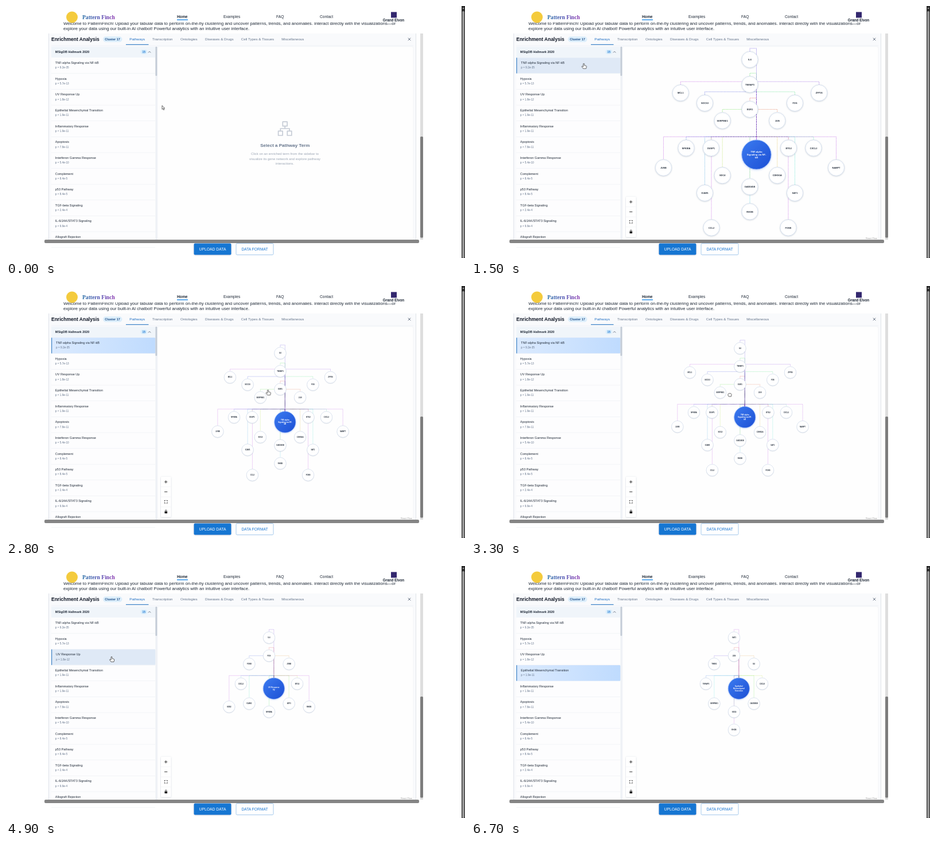
An HTML page for the animation above (6.8 s loop, 800 by 440 pixels).

```html
<!DOCTYPE html>
<html lang="en">
<head>
<meta charset="utf-8">
<title>Enrichment analysis</title>
<style>
  html, body { margin: 0; width: 100%; height: 100%; overflow: hidden; background: #fff; }
  svg { display: block; width: 800px; height: 440px; }
  text { font-family: "Liberation Sans", Arial, sans-serif; dominant-baseline: central; fill: #1f2937; white-space: pre; }
  .b { font-weight: 700; }
  .mid { text-anchor: middle; }
  .nav text { font-size: 6.7px; }
  .intro text { font-size: 7.65px; }
  .tabs text { font-size: 6.2px; fill: #64748b; }
  .hint text { font-size: 5.93px; fill: #9ca6b5; }
  .term { font-size: 5.5px; }
  .pval { font-size: 4.7px; fill: #64748b; }
  .gene { font-size: 3.9px; font-weight: 700; }
  .hub { font-size: 4.15px; font-weight: 700; fill: #fff; }
  .edges path { fill: none; stroke-width: .95; stroke-dasharray: 1.3 1.3; opacity: .58; }
  .line { fill: none; stroke-linecap: round; stroke-linejoin: round; }
  .cursor path { stroke: #222; stroke-width: .7; stroke-linejoin: round; fill: #fff; }
</style>
</head>
<body>
<svg viewBox="0 0 800 440">
  <defs>
    <linearGradient id="brand"><stop stop-color="#2a6fa8"/><stop offset=".5" stop-color="#4a4fb0"/><stop offset="1" stop-color="#8a36b0"/></linearGradient>
    <linearGradient id="picked"><stop stop-color="#dbeafe"/><stop offset="1" stop-color="#bfdbfe"/></linearGradient>
    <linearGradient id="hubFill" x2="1" y2="1"><stop stop-color="#3b7bf0"/><stop offset="1" stop-color="#1d4fd4"/></linearGradient>
    <filter id="soft" x="-30%" y="-30%" width="160%" height="160%"><feDropShadow dx="0" dy=".6" stdDeviation=".9" flood-color="#64748b" flood-opacity=".35"/></filter>
    <filter id="glow" x="-30%" y="-30%" width="160%" height="160%"><feDropShadow dx="0" dy="1" stdDeviation="1.8" flood-color="#2563eb" flood-opacity=".3"/></filter>
    <clipPath id="pane"><rect x="264" y="71" width="446" height="337"/></clipPath>
    <clipPath id="under"><rect y="28.5" width="790" height="20"/></clipPath>
  </defs>

  <rect width="800" height="440" fill="#fff"/>
  <g class="intro" clip-path="url(#under)">
    <text x="100" y="30">Welcome to PatternFinch! Upload your tabular data to perform on-the-fly clustering and uncover patterns, trends, and anomalies. Interact directly with the visualizations—or</text>
    <text x="100" y="39">explore your data using our built-in AI chatbot! Powerful analytics with an intuitive user interface.</text>
  </g>
  <g class="nav">
    <circle cx="115" cy="19.5" r="10" fill="#f4cb3d"/>
    <text x="133" y="19" class="b" style="font-family:'Liberation Serif',serif;font-size:9.6px;fill:url(#brand)">Pattern Finch</text>
    <text x="298" y="18.5" class="b">Home</text>
    <rect x="298" y="23.4" width="19" height="1.4" fill="#1e88e5"/>
    <text x="379" y="18.5">Examples</text>
    <text x="471" y="18.5">FAQ</text>
    <text x="547" y="18.5">Contact</text>
    <rect x="671" y="10.5" width="10" height="10" fill="#33276e"/>
    <text x="675.5" y="24.7" class="b mid" style="font-size:6.3px">Grand Elvon</text>
  </g>

  <!-- panel -->
  <rect x="74.5" y="48" width="640" height="366" fill="#f9fafc"/>
  <path d="M74.5 48V408M714.5 48V408" stroke="#dfe3e9"/>
  <rect x="79" y="71" width="183" height="340" fill="#fdfdfe"/>
  <rect x="264" y="71" width="446" height="340" rx="3" fill="#fefefe" stroke="#eef1f5" stroke-width=".6"/>
  <text x="79" y="58.3" class="b" style="font-size:8.5px;fill:#111827">Enrichment Analysis</text>
  <rect x="169" y="53.3" width="33.5" height="9.6" rx="4.8" fill="#dceefb"/>
  <text x="172.2" y="58.1" class="b" style="font-size:5.5px;fill:#1d4e89">Cluster 17</text>
  <g class="tabs">
    <text x="215.3" y="57.5" style="fill:#1f6fc4">Pathways</text>
    <text x="255" y="57.5">Transcription</text>
    <text x="304" y="57.5">Ontologies</text>
    <text x="347" y="57.5">Diseases &amp; Drugs</text>
    <text x="409.8" y="57.5">Cell Types &amp; Tissues</text>
    <text x="480.2" y="57.5">Miscellaneous</text>
  </g>
  <path d="M79 69.2H710" stroke="#e8ecf1" stroke-width=".6"/>
  <rect x="209" y="66.8" width="39.5" height="1.2" fill="#3b82c8"/>
  <path class="line" d="M701 56l4 4M705 56l-4 4" stroke="#475569" stroke-width=".8"/>

  <!-- sidebar -->
  <rect x="79" y="71" width="181" height="19" fill="#f0f5fa"/>
  <text x="85.8" y="80" class="b term">MSigDB Hallmark 2020</text>
  <rect x="234.7" y="76" width="11.3" height="8" rx="4" fill="#d9edfb"/>
  <text x="240.3" y="80.1" class="b mid" style="font-size:5px;fill:#1976d2">15</text>
  <path class="line" d="M248.2 81.2l1.9-1.9 1.9 1.9" stroke="#475569" stroke-width=".8"/>
  <g id="rows"></g>
  <rect x="260.5" y="71" width="3" height="337" fill="#eef1f5"/>
  <rect x="260.5" y="71" width="2.8" height="51" rx="1" fill="#c3cbd6"/>

  <!-- empty state -->
  <g id="empty">
    <path class="line" d="M482.3 202.2h7.8v7.5h-7.8zM474.6 218.4h7.5v7.6h-7.5zM490.3 218.4h7.5v7.6h-7.5zM486.2 210v4M478.3 218v-4h15.8v4" stroke="#c6ccd6" stroke-width="1.7"/>
    <text x="486.3" y="243.5" class="b mid" style="font-size:8px;fill:#64748b">Select a Pathway Term</text>
    <g class="hint mid">
      <text x="486" y="257.6">Click on an enriched term from the sidebar to</text>
      <text x="486" y="266.5">visualize its gene network and explore pathway</text>
      <text x="486" y="275.4">interactions.</text>
    </g>
  </g>

  <!-- network -->
  <g clip-path="url(#pane)">
    <g id="view"></g>
    <g id="tools">
      <rect x="270" y="333" width="17.5" height="70.5" rx="1.5" fill="#fff" filter="url(#soft)"/>
      <path d="M270 350.6h17.5M270 368.2h17.5M270 385.8h17.5" stroke="#eef0f3" stroke-width=".6"/>
      <path class="line" d="M276.5 342h4.4M278.7 339.8v4.4M276.5 359.4h4.4" stroke="#222" stroke-width=".9"/>
      <path d="M276.4 376v-1.6h1.6M279.6 374.4h1.6v1.6M281.2 377.6v1.6h-1.6M278 379.2h-1.6v-1.6" fill="none" stroke="#222" stroke-width=".8"/>
      <rect x="276.5" y="393.4" width="4.6" height="3.6" rx=".6" fill="#111"/>
      <path class="line" d="M277.5 393.4v-1a1.3 1.3 0 0 1 2.6 0v1" stroke="#111" stroke-width=".8"/>
      <text x="688" y="405.8" style="font-size:4px;fill:#999">React Flow</text>
    </g>
    <rect id="veil" x="264.5" y="71.5" width="445" height="337" fill="#fefefe" fill-opacity=".85"/>
    <g id="loader" transform="translate(486 240)">
      <circle r="9.8" fill="none" stroke="#dadee5" stroke-width="1.7"/>
      <circle id="arc" r="9.8" fill="none" stroke="#2f6bea" stroke-width="1.7" stroke-dasharray="14 100"/>
    </g>
  </g>

  <!-- scrollbars and buttons -->
  <rect x="722" y="48" width="5" height="360" fill="#dedede"/>
  <rect x="722" y="228" width="5" height="176.5" rx="1.5" fill="#7d7d7d"/>
  <rect x="67" y="408" width="653" height="6" rx="2" fill="#858585"/>
  <rect x="327.5" y="414.5" width="65" height="20" rx="2" fill="#1976d2" filter="url(#soft)"/>
  <text x="360" y="424" class="mid" style="font-size:6.8px;fill:#fff">UPLOAD DATA</text>
  <rect x="401" y="414.5" width="65" height="20" rx="2" fill="#fff" stroke="#8fbce8" stroke-width=".8"/>
  <text x="433.5" y="424" class="mid" style="font-size:6.7px;fill:#1976d2">DATA FORMAT</text>
  <rect x="794" width="6" height="440" fill="#2d2d2d"/>
  <rect x="795.2" y="9" width="3.7" height="431" rx="1.5" fill="#9b9b9b"/>
  <path d="M795.5 5l1.6-2.5 1.6 2.5z" fill="#aaa"/>

  <g id="cursor" class="cursor">
    <path id="arrow" d="M0 0V6.6L1.6 5.2 2.7 7.7 3.8 7.2 2.7 4.8H4.7Z"/>
    <path id="hand" d="M-.9 .8Q0-.7 .9 .8V3.6L4 4.4Q5 4.8 4.8 6L4 9.3H-1L-3.4 5.8Q-3.3 4.6-2.2 5L-.9 6Z"/>
    <path id="fist" d="M-2.6-1.6Q-1.8-3-.8-2.2Q.2-3 1-2.2Q2.2-2.6 2.6-1.4Q3.4-1 3 .8L2.3 3H-1.7L-3.2 .6Z"/>
  </g>
</svg>

<script>
const LOOP = 6800;
const $ = id => document.getElementById(id);

function add(parent, tag, attrs = {}, text = "") {
  const el = document.createElementNS("http://www.w3.org/2000/svg", tag);
  for (const k in attrs) el.setAttribute(k, attrs[k]);
  el.textContent = text;
  return parent.appendChild(el);
}

// keys: [ms, value, easing]; holds the first and last value at the ends
function animate(el, prop, keys, easing = "linear") {
  const all = [...keys];
  if (all[0][0] > 0) all.unshift([0, all[0][1]]);
  if (all.at(-1)[0] < LOOP) all.push([LOOP, all.at(-1)[1]]);
  el.animate(all.map(([t, v, e]) => ({ offset: t / LOOP, [prop]: v, easing: e || easing })),
    { duration: LOOP, iterations: Infinity });
}

// on: value inside the [from, to] spans, off: elsewhere, with hard changes
function toggle(el, prop, on, off, spans) {
  const keys = [];
  if (spans[0][0] > 0) keys.push([0, off]);
  for (const [from, to] of spans) {
    keys.push([from, on]);
    if (to < LOOP) keys.push([to, off]);
  }
  animate(el, prop, keys, "step-end");
}
const show = (el, ...spans) => toggle(el, "opacity", 1, 0, spans);

// sidebar terms
const terms = [
  ["TNF-alpha Signaling via NF-kB", "9.2e-35"], ["Hypoxia", "5.7e-13"],
  ["UV Response Up", "1.8e-12"], ["Epithelial Mesenchymal Transition", "1.9e-11"],
  ["Inflammatory Response", "1.9e-11"], ["Apoptosis", "7.8e-11"],
  ["Interferon Gamma Response", "5.4e-10"], ["Complement", "8.4e-5"],
  ["p53 Pathway", "8.4e-5"], ["TGF-beta Signaling", "2.4e-4"],
  ["IL-6/JAK/STAT3 Signaling", "9.9e-4"], ["Allograft Rejection", ""]
];
// row: selected span, end of press, pointer leaves, press colour, press left edge
const picks = {
  0: { span: [800, 4300], press: 1400, leave: 1700, fill: "#b4bac4", x: 105 },
  2: { span: [4300, 5100], press: 4900, leave: 5100, fill: "#a9aeb5", x: 110 },
  3: { span: [5100, LOOP], press: 5700, leave: 5800, fill: "#b8c0cf", x: 99 }
};
terms.forEach(([name, p], i) => {
  const top = 90.3 + 27.63 * i, pick = picks[i];
  add($("rows"), "rect", { x: 79, y: top + 27.2, width: 181, height: .6, fill: "#eceff3" });
  if (pick) {
    const bg = add($("rows"), "g");
    const box = (x, fill) => add(bg, "rect", { x, y: top, width: 260.5 - x, height: 27.3, rx: 1.5, fill });
    box(79, "#dfe9f6");
    show(box(pick.x, pick.fill), [pick.span[0], pick.press]);
    if (pick.leave < pick.span[1]) show(box(79, "url(#picked)"), [pick.leave, pick.span[1]]);
    add(bg, "rect", { x: 79, y: top, width: 1.2, height: 27.3, fill: "#3f83c6" });
    show(bg, pick.span);
  }
  const label = add($("rows"), "g");
  add(label, "text", { x: 85.8, y: top + 8.8, class: "term" }, name);
  if (p) add(label, "text", { x: 85.8, y: top + 17.6, class: "pval" }, "p = " + p);
  if (pick) toggle(label, "transform", "translate(1.3px,0)", "translate(0,0)", [pick.span]);
});

// network: genes on rings around a hub, all linked from the hub's top
const R = 14.5, HUB = 26, C = HUB - R;
function network(title, rings, span) {
  const g = add($("view"), "g"), edges = add(g, "g", { class: "edges" });
  const total = rings.flat().length;
  let i = 0;
  rings.forEach((genes, ring) => genes.forEach((gene, k) => {
    const a = 2 * Math.PI * k / genes.length - Math.PI / 2, r = 67.6 + 43.4 * ring;
    const x = r * Math.cos(a), y = r * Math.sin(a);
    const turn = Math.min(-R, y - R) - 5.2;
    const hue = Math.min(360 * i++ / total, 285);
    add(edges, "path", { d: `M${C} ${-R}V${turn}H${x}V${y - R}`, stroke: `hsl(${hue} 70% 50%)` });
    const node = add(g, "g", { transform: `translate(${x} ${y})` });
    add(node, "circle", { r: R - .4, fill: "#fff", stroke: "#d3deee", "stroke-width": .9, filter: "url(#soft)" });
    add(node, "text", { class: "gene mid" }, gene);
  }));
  const hub = add(g, "g", { transform: `translate(${C} ${C})` });
  add(hub, "circle", { r: HUB - .4, fill: "url(#hubFill)", stroke: "#8fb3f6", "stroke-width": .8, filter: "url(#glow)" });
  title.forEach((line, n) =>
    add(hub, "text", { class: "hub mid", y: (n - (title.length - 1) / 2) * 5.3 }, line));
  animate(edges, "strokeDashoffset", [[0, "35.36px"], [LOOP, "0px"]]);
  show(g, span);
}
network(["TNF-alpha", "Signaling via NF-", "kB"], [
  ["EGR1", "JUN", "BTG2", "CDKN1A", "GADD45B", "SDC4", "DUSP1", "SERPINE1"],
  ["TNFAIP3", "FOS", "CXCL2", "SAT1", "RHOB", "ICAM1", "NFKBIA", "SOCS3"],
  ["IL6", "ZFP36", "NAMPT", "FOSB", "CCL2", "JUNB", "MCL1"]
], [1200, 4700]);
network(["UV Response", "Up"], [
  ["FOS", "JUNB", "BTG2", "ATF3", "NFKBIA", "ICAM1", "CXCL2", "FOSB"],
  ["IL6", "RHOB", "SOD2"]
], [4700, 5500]);
network(["Epithelial", "Mesenchymal", "Transition"], [
  ["JUN", "IL6", "CXCL8", "GADD45B", "SDC4", "SERPINE1", "TNFAIP3", "THBS1"],
  ["SAT1", "RHOB"]
], [5500, LOOP]);

show($("empty"), [0, 800]);
show($("tools"), [1200, LOOP]);
show($("veil"), [4300, 4700], [5100, 5500]);
show($("loader"), [800, 1200], [4300, 4700], [5100, 5500]);
animate($("arc"), "transform", [[0, "rotate(157deg)"], [LOOP, `rotate(${157 + 360 * LOOP / 1000}deg)`]]);

// zoom about the pointer, then drag
const at = (x, y, s) => `translate(${x}px,${y}px) scale(${s})`;
animate($("view"), "transform", [
  [2200, at(486, 248, 1)], [2700, at(478, 229.2, .725)],
  [2900, at(478, 229.2, .725)], [3300, at(469, 220.8, .725)], [3500, at(458.5, 205.6, .725)]
]);

const pos = (x, y) => `translate(${x}px,${y}px)`, ease = "ease-in-out";
animate($("cursor"), "transform", [
  [100, pos(272, 173.7), ease], [700, pos(196.5, 100)],
  [1500, pos(196.5, 100), ease], [2100, pos(456.5, 181)],
  [2800, pos(456.5, 181)], [2900, pos(460, 198.3)], [3300, pos(451, 190)], [3500, pos(440.5, 174.8)],
  [3600, pos(440.5, 174.8), ease], [4200, pos(184, 158)],
  [4900, pos(184, 158), ease], [5100, pos(197.5, 193.5)],
  [5700, pos(197.5, 193.5), ease], [6300, pos(22, 170)]
]);
show($("arrow"), [0, 400], [5900, 6300]);
show($("hand"), [400, 2900], [3500, 5900]);
show($("fist"), [2900, 3500]);
</script>
</body>
</html>
```
